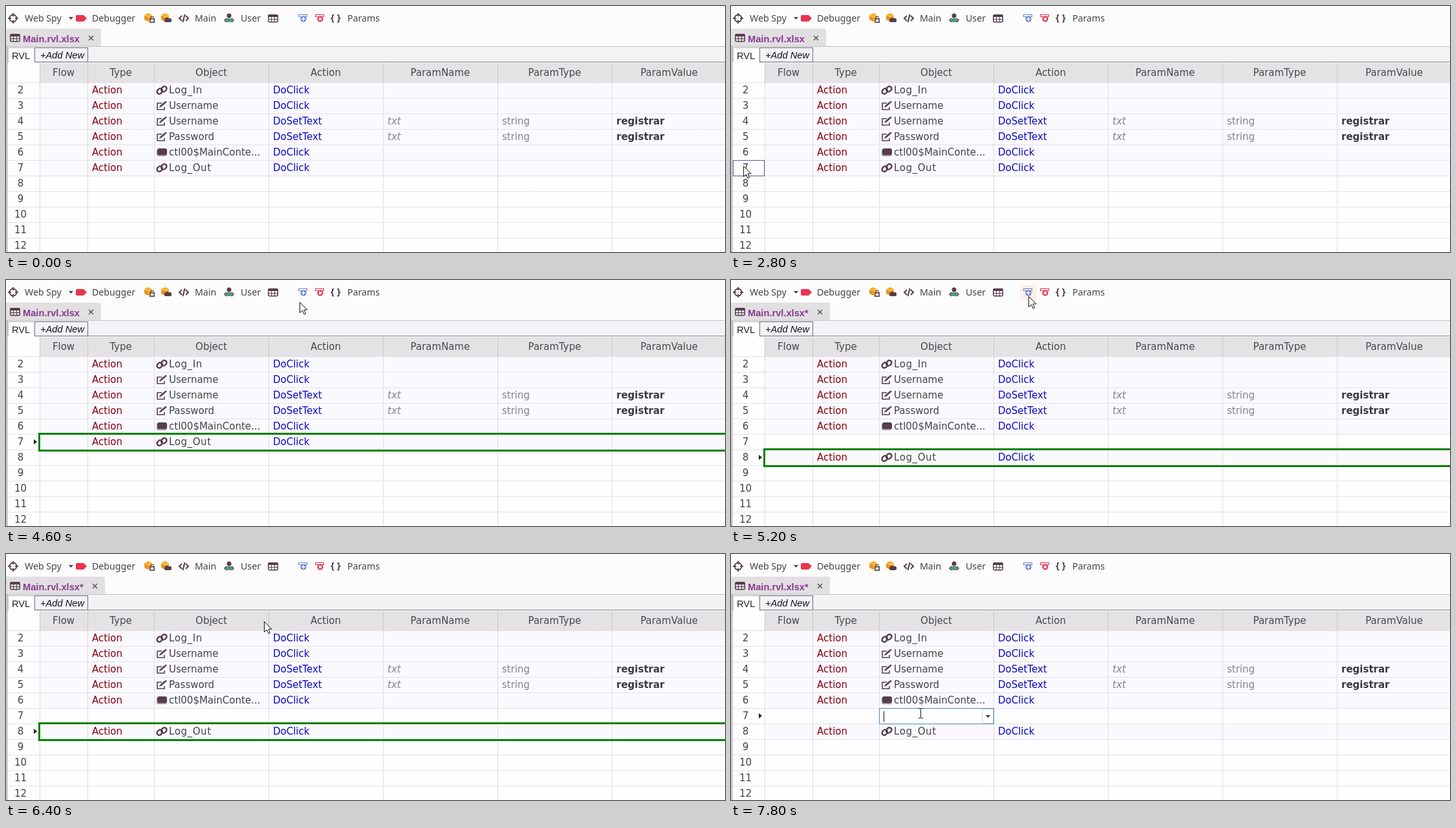
Recreate the animation shown at these times as an HTML page with a canvas. Size 1112 by 380 pixels, loop 8000 ms.

```html
<!DOCTYPE html>
<html lang="en">
<head>
<meta charset="utf-8">
<title>Test grid</title>
<style>
html, body { margin: 0; width: 100%; height: 100%; overflow: hidden; background: #fdfcfd; }
canvas { display: block; }
</style>
</head>
<body>
<canvas id="stage" width="1112" height="380"></canvas>
<script>
const c = document.getElementById('stage').getContext('2d');
const LOOP = 8000, STEP = 200;
const GRID = '15px "DejaVu Sans", Verdana, sans-serif';
const MENU = '14.2px "Noto Sans", "Open Sans", sans-serif';
const TAB = '14.67px "Liberation Sans", Arial, sans-serif';
const DARK = '#553f4b', INK = '#444245', GREEN = '#008000';
const cols = [3, 52, 126, 229, 406, 583, 760, 937, 1114];
const heads = ['Flow', 'Type', 'Object', 'Action', 'ParamName', 'ParamType', 'ParamValue'];
const steps = [
  ['link', 'Log_In', 'DoClick'],
  ['edit', 'Username', 'DoClick'],
  ['edit', 'Username', 'DoSetText', 'registrar'],
  ['edit', 'Password', 'DoSetText', 'registrar'],
  ['button', 'ctl00$MainConte...', 'DoClick'],
  ['link', 'Log_Out', 'DoClick']
];
// Pointer stops: time, x, y
const path = [
  [1400, 217, 338], [1600, 110, 296], [1800, 42, 265], [2000, 27, 252], [2400, 19, 247],
  [3400, 19, 247], [4600, 454, 34], [4800, 460, 25],
  [6000, 460, 25], [7000, 287, 250], [7200, 291, 244], [8000, 291, 244]
];
const rowTop = n => 118 + 24 * (n - 2);

function rect(x, y, w, h, fill) {
  c.fillStyle = fill;
  c.fillRect(x, y, w, h);
}
function frame(x, y, w, h, color, width = 1) {
  c.strokeStyle = color;
  c.lineWidth = width;
  c.strokeRect(x, y, w, h);
}
function line(points, color, width = 1, dash = []) {
  c.beginPath();
  points.forEach(p => c.lineTo(...p));
  c.strokeStyle = color;
  c.lineWidth = width;
  c.setLineDash(dash);
  c.stroke();
  c.setLineDash([]);
}
function poly(points, fill, stroke) {
  c.beginPath();
  points.forEach(p => c.lineTo(...p));
  c.closePath();
  c.fillStyle = fill;
  c.fill();
  if (stroke) {
    c.strokeStyle = stroke;
    c.lineWidth = 1;
    c.stroke();
  }
}
function disc(x, y, r, fill) {
  c.beginPath();
  c.arc(x, y, r, 0, 7);
  c.fillStyle = fill;
  c.fill();
}
function pill(x, y, w, h, r, fill) {
  c.beginPath();
  c.roundRect(x, y, w, h, r);
  c.fillStyle = fill;
  c.fill();
}
function text(s, x, y, font, color = INK, align = 'left') {
  c.font = font;
  c.fillStyle = color;
  c.textAlign = align;
  c.fillText(s, x, y);
}

const icons = {
  link(x, y) {
    c.save();
    c.translate(x, y);
    c.rotate(-Math.PI / 4);
    c.strokeStyle = DARK;
    c.lineWidth = 2.4;
    for (const [dx, dy] of [[-8, -4.6], [-1, -2.4]]) {
      c.beginPath();
      c.roundRect(dx, dy, 9, 7, 3.5);
      c.stroke();
    }
    c.restore();
  },
  edit(x, y) {
    line([[x, y - 4], [x - 7, y - 4], [x - 7, y + 6], [x + 4, y + 6], [x + 4, y + 2]], DARK, 1.6);
    line([[x - 2, y + 1], [x + 5, y - 5]], DARK, 2.8);
    poly([[x - 4, y + 3], [x - 3, y], [x - 1, y + 2]], DARK);
    line([[x + 5, y - 5], [x + 7, y - 6.5]], DARK, 2.6);
  },
  button(x, y) {
    pill(x - 8, y - 5, 16, 11, 3, '#a58fa2');
    pill(x - 7, y - 6, 15, 10, 3, DARK);
  }
};

function tableIcon(x, y) {
  rect(x + 1, y, 14, 4, DARK);
  c.beginPath();
  c.roundRect(x + .75, y + .75, 14.5, 11, 2);
  c.strokeStyle = DARK;
  c.lineWidth = 1.5;
  c.stroke();
  line([[x, y + 7.5], [x + 16, y + 7.5]], DARK);
  for (const dx of [5.5, 10.5]) line([[x + dx, y + 3], [x + dx, y + 12]], DARK);
}
function cubes(x, locked) {
  poly([[x, 14], [x + 6, 11], [x + 12, 14], [x + 12, 21], [x + 6, 24], [x, 21]], '#f6ac28');
  poly([[x, 14], [x + 6, 16.5], [x + 6, 24], [x, 21]], '#ea941c');
  line([[x, 14], [x + 6, 16.5], [x + 12, 14]], '#ffd98a');
  if (locked) {
    rect(x + 8, 19, 8, 7, DARK);
    frame(x + 10, 16.5, 4, 3, DARK);
    rect(x + 9.5, 20.5, 5, 4, '#eee4d8');
  } else {
    pill(x + 5, 19, 11, 6, 2, DARK);
    rect(x + 7, 18, 4, 2, DARK);
  }
}
function rowIcon(x, color, cross) {
  frame(x - 6.5, 13.5, 13, 3, color);
  disc(x + 1, 20, 4.6, color);
  c.save();
  c.translate(x + 1, 20);
  if (cross) c.rotate(Math.PI / 4);
  line([[-3, 0], [3, 0]], '#fff', 1.6);
  line([[0, -3], [0, 3]], '#fff', 1.6);
  c.restore();
}

function toolbar(hover) {
  c.beginPath();
  c.arc(11, 19, 5.5, 0, 7);
  c.strokeStyle = DARK;
  c.lineWidth = 1.8;
  c.stroke();
  for (const [a, b] of [[-8, -3], [3, 8]]) {
    line([[11 + a, 19], [11 + b, 19]], DARK, 1.8);
    line([[11, 19 + a], [11, 19 + b]], DARK, 1.8);
  }
  text('Web Spy', 29, 24, MENU);
  poly([[97, 17], [104, 17], [100.5, 21]], INK);
  pill(108, 14, 12, 10, 2, '#e8354f');
  poly([[118, 14], [120, 14], [125, 19], [120, 24], [118, 24]], '#e8354f');
  text('Debugger', 133, 24, MENU);
  cubes(214, true);
  cubes(240, false);
  line([[272, 15], [268, 19], [272, 23]], DARK, 2);
  line([[278, 15], [282, 19], [278, 23]], DARK, 2);
  line([[276.5, 13], [273.5, 25]], DARK, 2);
  text('Main', 292, 24, MENU);
  disc(345, 15, 3.5, DARK);
  pill(340, 19, 10, 6, 3, '#4c9a78');
  line([[341, 19], [338, 22], [341, 25]], DARK, 1.6);
  line([[349, 19], [352, 22], [349, 25]], DARK, 1.6);
  text('User', 363, 24, MENU);
  tableIcon(405, 13);
  if (hover) rect(448, 8, 24, 23, '#fdf0e2');
  rowIcon(459, '#6680cc', false);
  rowIcon(485, '#dc3150', true);
  text('{ }', 502, 23, 'bold 15px "Noto Sans", sans-serif', DARK);
  text('Params', 528, 24, MENU);
}

function tabs(changed) {
  const w = changed ? 153 : 147, x = w - 16;
  pill(0, 35, w, 28, [0, 3, 0, 0], '#e2dfe3');
  tableIcon(6, 43);
  text('Main.rvl.xlsx' + (changed ? '*' : ''), 26, 56, 'bold ' + TAB, '#873a8d');
  line([[x - 3, 46], [x + 4, 53]], '#555', 1.5);
  line([[x + 4, 46], [x - 3, 53]], '#555', 1.5);
  rect(0, 62, 1112, 25, '#f3f2f4');
  rect(0, 62, 1112, 1, '#c4c1c6');
  rect(3, 65, 42, 22, '#fff');
  line([[3.5, 87], [3.5, 64.5], [44.5, 64.5]], '#b5b3b7');
  rect(45, 65, 81, 22, '#f4f4f8');
  frame(44.5, 64.5, 82, 22, '#6c6a70');
  rect(126, 86, 986, 1, '#858288');
  text('RVL', 9, 82, TAB, '#222');
  text('+Add New', 53, 81, 'italic ' + TAB, '#111');
}

function grid(inserted) {
  rect(2, 87, 1110, 293, '#fefefe');
  rect(52, 88, 1060, 30, '#e5e2e6');
  line([[3, 118.5], [1112, 118.5]], '#c9c6cc', 1, [1, 1]);
  for (let n = 2; n <= 12; n++) {
    const y = rowTop(n), item = steps[inserted && n > 6 ? n - 3 : n - 2];
    const data = inserted && n === 7 ? null : item;
    if (data) rect(52, y + 1, 1060, 23, '#faf9fd');
    line([[3, y + 24.5], [1112, y + 24.5]], '#c9c6cc', 1, [1, 1]);
    text(n, 22.5, y + 17, GRID, INK, 'center');
    if (!data) continue;
    const [icon, name, action, value] = data;
    text('Action', 133, y + 17, GRID, '#850012');
    icons[icon](241, y + 12);
    c.letterSpacing = name.includes('_') ? '.6px' : '0px';
    text(name, 252, y + 17, GRID);
    c.letterSpacing = '0px';
    text(action, 413, y + 17, GRID, '#0a0ac0');
    if (value) {
      text('txt', 590, y + 17, 'italic ' + GRID, '#858388');
      text('string', 767, y + 17, GRID, '#858388');
      text(value, 944, y + 17, 'bold ' + GRID, '#3c3a3d');
    }
  }
  cols.slice(1, -1).forEach(x => {
    rect(x, 88, 1, 30, '#cbc8cd');
    rect(x, 118, 1, 262, '#e0dde2');
  });
  heads.forEach((h, i) => text(h, (cols[i + 1] + cols[i + 2]) / 2, 108, GRID, '#49474b', 'center'));
  rect(1, 62, 1, 318, '#858288');
}

function marker(n) {
  const y = rowTop(n) + 12;
  poly([[43, y - 4], [48, y], [43, y + 4]], '#222');
}
function selection(n) {
  const y = rowTop(n);
  frame(51.5, y - .5, 1070, 26, GREEN, 3);
  line([[54, y + 1.5], [1112, y + 1.5]], '#fff', 1, [1, 1]);
  line([[54, y + 23.5], [1112, y + 23.5]], '#fff', 1, [1, 1]);
  line([[53.5, y + 2], [53.5, y + 24]], '#fff', 1, [1, 1]);
}
function dropdown(n) {
  const y = rowTop(n);
  rect(388, y + 1, 18, 23, '#fff');
  frame(388.5, y + 1.5, 17, 22, '#d3d0d6');
  poly([[394, y + 11], [401, y + 11], [397.5, y + 15]], '#333');
}
function editor(n) {
  const y = rowTop(n);
  rect(230, y + 1, 176, 23, '#fff');
  dropdown(n);
  frame(229.5, y + .5, 177, 24, '#4d8cb8');
  rect(236, y + 5, 1, 16, '#111');
}

function pointerAt(t) {
  if (t < path[0][0]) return null;
  const i = path.findIndex(p => p[0] > t);
  const [t0, x0, y0] = path[i - 1], [t1, x1, y1] = path[i];
  const p = (t - t0) / (t1 - t0);
  const k = t1 - t0 > 900 ? p * p * (3 - 2 * p) : p;
  return [Math.round(x0 + (x1 - x0) * k), Math.round(y0 + (y1 - y0) * k)];
}
function arrow(x, y) {
  const shape = [[0, 0], [0, 16], [4, 12.5], [6.5, 18.5], [9, 17.5], [6.5, 11.5], [11.5, 11.5]];
  poly(shape.map(([a, b]) => [x + a + .5, y + b + .5]), '#fff', '#111');
}
function beam(x, y) {
  rect(x, y - 6, 1, 14, '#111');
  for (const dy of [-7, 8]) {
    rect(x - 3, y + dy, 3, 1, '#111');
    rect(x + 1, y + dy, 3, 1, '#111');
  }
}

function draw(t) {
  const pos = pointerAt(t), inserted = t >= 5200, editing = t >= 7400;
  const [x, y] = pos || [-1, -1];
  const row = Math.floor((y - 118) / 24) + 2;
  rect(0, 0, 1112, 380, '#fdfcfd');
  toolbar(x > 448 && x < 472 && y < 31);
  tabs(inserted);
  grid(inserted);
  if (t >= 3000) marker(inserted && !editing ? 8 : 7);
  if (t >= 3000 && !editing) selection(inserted ? 8 : 7);
  if (row > 1 && x > 2 && x < 52) frame(3.5, rowTop(row) + .5, 48, 24, '#466490');
  if (editing) editor(7);
  else if (row > 1 && x > 229 && x < 406 && inserted) dropdown(row);
  if (t >= 7600) beam(293, 245);
  else if (pos) arrow(x, y);
}

function tick() {
  const t = performance.now() % LOOP;
  draw(Math.floor(t / STEP) * STEP);
  requestAnimationFrame(tick);
}
tick();
</script>
</body>
</html>
```
